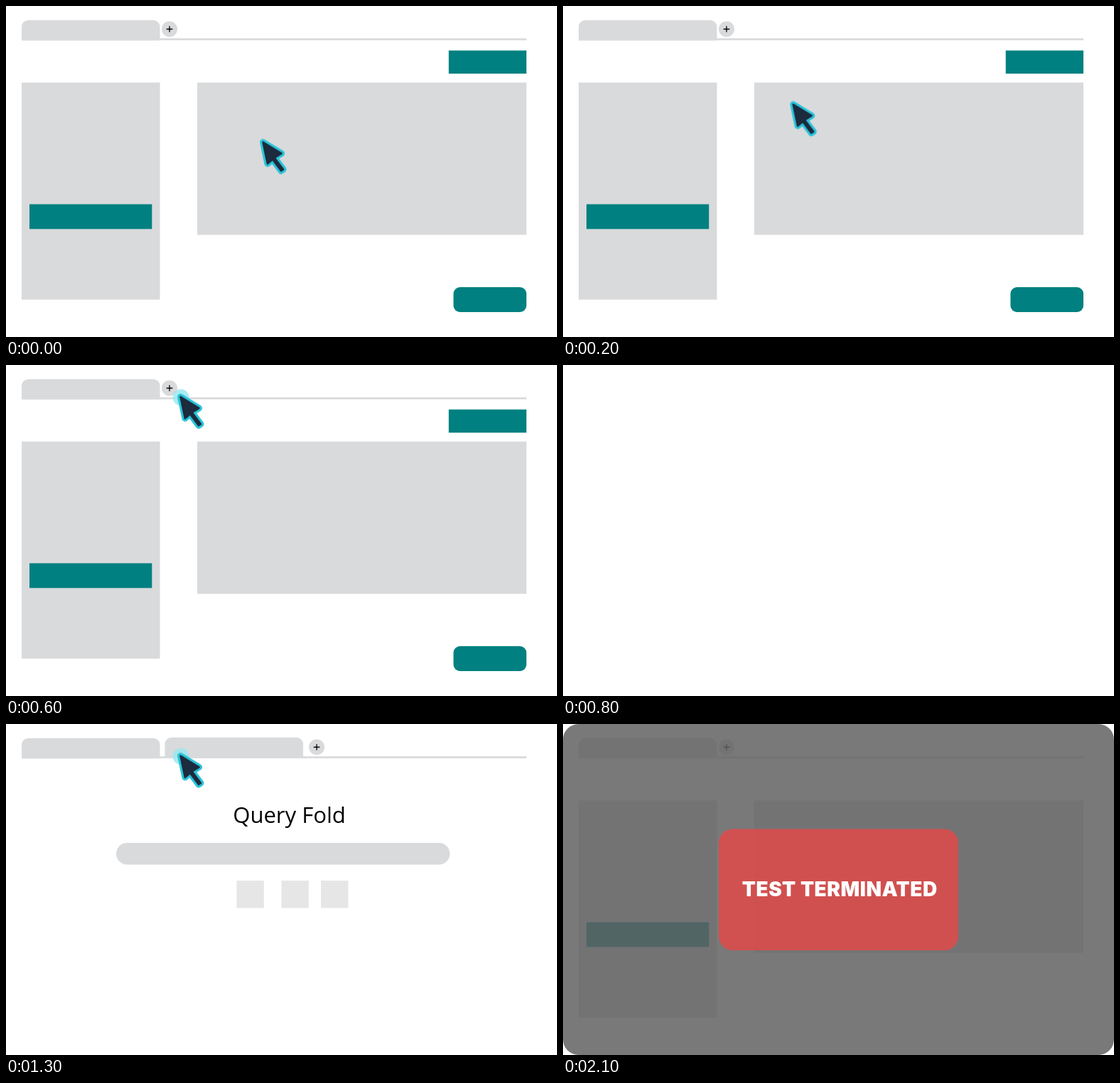
Write an HTML page that moves like this. It is 775 by 465 pixels and loops after 2500 ms.

```html
<!DOCTYPE html>
<html lang="en">
<head>
<meta charset="utf-8">
<title>Tab switch test</title>
<style>
  html, body { margin: 0; width: 100%; height: 100%; overflow: hidden; background: #fff; }
  svg { display: block; width: 775px; height: 465px; }

  .gray { fill: #d9dadc; }
  .teal { fill: #008080; }
  .tile { fill: #e6e6e6; }
  .plus path { fill: none; stroke: #000; stroke-width: 1.3; }
  .hub-name { font: 31px "Open Sans", "Noto Sans", sans-serif; text-anchor: middle; }
  .alert-text { font: 900 28px Inter, "Liberation Sans", sans-serif; letter-spacing: .5px; text-anchor: middle; fill: #fff; }
  .pointer { stroke-linejoin: round; }
  .pointer .rim { fill: #29c4d9; stroke: #29c4d9; stroke-width: 9; }
  .pointer .core { fill: #1c2b3d; stroke: #1c2b3d; stroke-width: 2.6; }

  /* Every change is a hard cut */
  .bar, .page, .actions, .pointer, .click, .hub, .alert {
    animation: 2500ms step-end infinite;
  }
  .bar { animation-name: bar; }
  .page { animation-name: page; }
  .actions { animation-name: actions; }
  .pointer { animation-name: pointer; }
  .click { animation-name: click; }
  .hub { animation-name: hub; }
  .alert { animation-name: alert; }

  @keyframes bar { 0%, 40%, 100% { opacity: 1; } 32% { opacity: 0; } }
  @keyframes page { 0%, 60%, 100% { opacity: 1; } 32% { opacity: 0; } }
  @keyframes actions { 0% { opacity: 1; } 32%, 100% { opacity: 0; } }
  @keyframes click { 0%, 32%, 60%, 100% { opacity: 0; } 24%, 40% { opacity: 1; } }
  @keyframes hub { 0%, 60%, 100% { opacity: 0; } 40% { opacity: 1; } }
  @keyframes alert { 0% { opacity: 0; } 60%, 100% { opacity: 1; } }
  @keyframes pointer {
    0% { transform: translate(357px, 186.3px); opacity: 1; }
    8% { transform: translate(319.3px, 133.2px); opacity: 1; }
    16% { transform: translate(281.2px, 83.7px); opacity: 1; }
    24% { transform: translate(241px, 39.7px); opacity: 1; }
    32% { transform: translate(241px, 39.7px); opacity: 0; }
    40% { transform: translate(241px, 39.7px); opacity: 1; }
    60%, 100% { transform: translate(241px, 39.7px); opacity: 0; }
  }
</style>
</head>
<body>
<svg viewBox="0 0 775 465">
  <defs>
    <path id="tab" d="M0 28.5V9a9 9 0 0 1 9-9H185.5a9 9 0 0 1 9 9V28.5Z"/>
    <g id="plus" class="plus">
      <circle class="gray" r="11"/>
      <path d="M-4.3 0H4.3M0-4.3V4.3"/>
    </g>
    <path id="arrow" d="M4.5 5L30.5 20.8L20.5 26.8L33 43.2L30 45.2L18 29.2L10.8 35.2Z"/>
  </defs>

  <g class="bar">
    <use href="#tab" class="gray" x="22" y="20"/>
    <rect class="gray" x="216" y="45.4" width="516" height="2.8"/>
  </g>

  <g class="page">
    <use href="#plus" x="230" y="32.5"/>
    <rect class="gray" x="22" y="107.5" width="194.5" height="305"/>
    <rect class="gray" x="269" y="107.5" width="463" height="214"/>
    <rect class="teal" x="33" y="278.5" width="172.3" height="34.8"/>
  </g>

  <g class="actions">
    <rect class="teal" x="622.7" y="62.5" width="109.3" height="32.5"/>
    <rect class="teal" x="629.4" y="395" width="102.6" height="35" rx="9"/>
  </g>

  <g class="hub">
    <use href="#tab" class="gray" x="223.4" y="19"/>
    <use href="#plus" x="437" y="32.5"/>
    <text class="hub-name" x="398.5" y="139">Query Fold</text>
    <rect class="gray" x="155" y="167" width="469.3" height="30.5" rx="15.25"/>
    <rect class="tile" x="324.4" y="220" width="38.4" height="38.4"/>
    <rect class="tile" x="387.4" y="220" width="38.4" height="38.4"/>
    <rect class="tile" x="443" y="220" width="38.4" height="38.4"/>
  </g>

  <circle class="click" cx="246" cy="45.5" r="11.5" fill="#96e8f0" fill-opacity=".8"/>

  <g class="pointer">
    <use href="#arrow" class="rim"/>
    <use href="#arrow" class="core"/>
  </g>

  <g class="alert">
    <rect width="775" height="465" rx="22" fill="#606060" fill-opacity=".843"/>
    <rect x="219" y="147.5" width="337" height="170.5" rx="20" fill="#e84847" fill-opacity=".8"/>
    <text class="alert-text" x="389.3" y="241.5">TEST TERMINATED</text>
  </g>
</svg>
</body>
</html>
```
